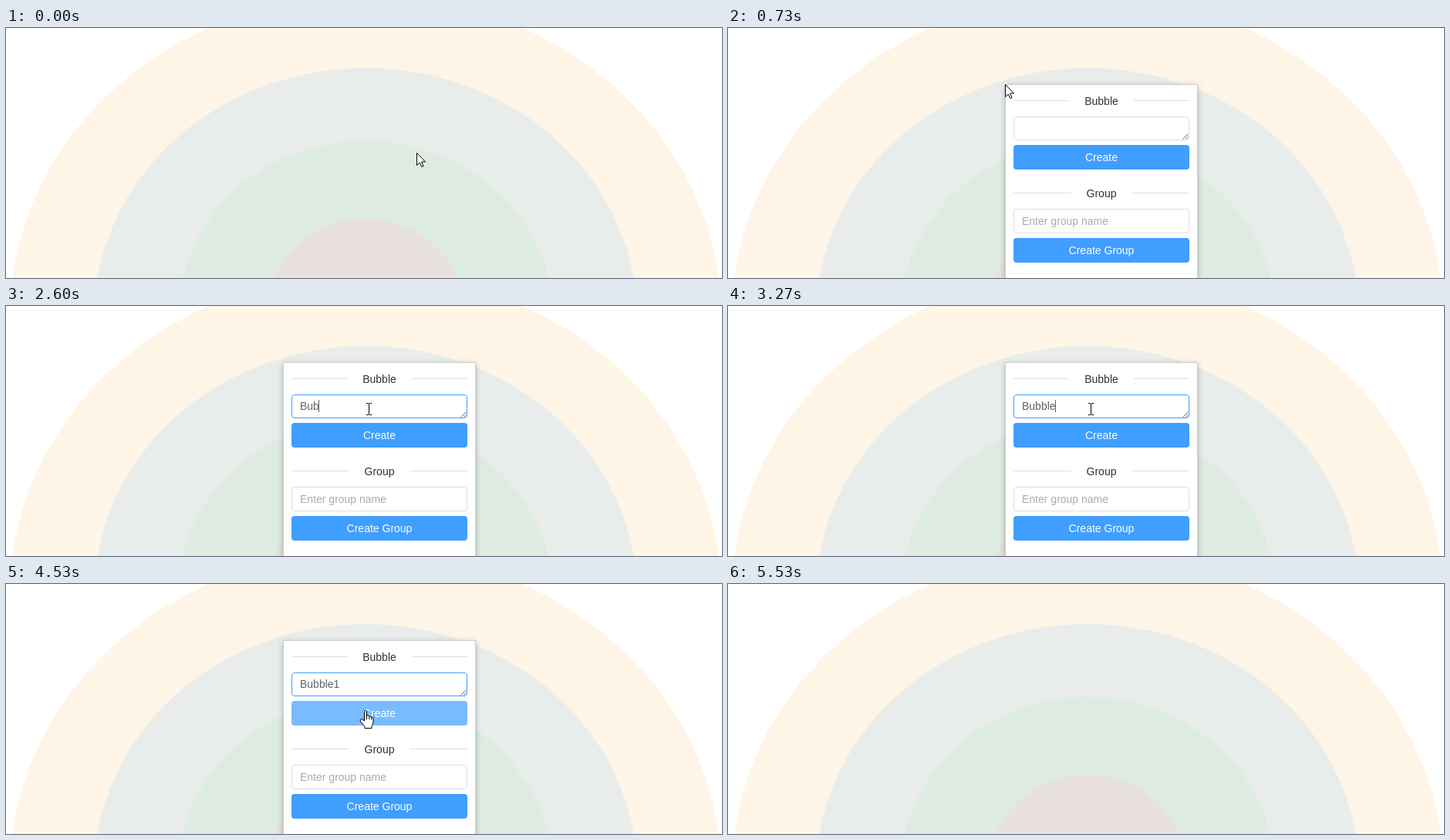
An HTML page with a canvas for the animation above (6.47 s loop, 928 by 325 pixels).

```html
<!DOCTYPE html>
<html lang="en">
<head>
<meta charset="utf-8">
<title>Create a bubble</title>
<style>
  html, body { margin: 0; width: 100%; height: 100%; overflow: hidden; background: #fff; }
  canvas { display: block; }
</style>
</head>
<body>
<canvas id="stage" width="928" height="325"></canvas>
<script>
const ctx = document.getElementById('stage').getContext('2d');
const LOOP = 6470, TICK = 1000 / 15;
const FONT = '14px "Liberation Sans", Arial, sans-serif';

// Moments of the story, in ticks
const OPEN = 11, HOVER_FIELD = 17, FOCUS = 20, HOVER_BUTTON = 65, PRESS = 76, CLOSE = 78, LEAVE = 83;
const KEYS = [32, 36, 39, 42, 45, 49, 56];
const WORD = 'Bubble1';
const BLINK = 8;

const GREY = [220, 223, 230], DARK_GREY = [192, 196, 204], BLUE = [64, 158, 255];
const LIGHT_BLUE = [121, 187, 255], DEEP_BLUE = [51, 126, 204];

// Pointer path: tick, x, y
const PATH = [
  [0, 532, 162], [1, 527, 157], [2, 505, 138], [3, 462, 108], [4, 410, 80], [5, 374, 66],
  [6, 357, 65], [7, 359, 73], [12, 359, 73], [13, 361, 74], [14, 375, 82], [15, 400, 97],
  [16, 428, 113], [17, 450, 124], [18, 463, 131], [19, 470, 134], [61, 470, 134],
  [62, 467, 134], [63, 467, 134], [64, 460, 148], [65, 463, 157], [66, 465, 162],
  [67, 466, 164], [79, 466, 164], [80, 440, 182], [81, 350, 232], [82, 175, 304]
];

const clamp = v => Math.max(0, Math.min(1, v));
const rgb = c => `rgb(${c.map(Math.round).join()})`;
const mix = (a, b, p) => a.map((v, i) => v + (b[i] - v) * p);

// Fades from one colour to the next at each [tick, colour, length]
function fade(tick, start, changes) {
  return changes.reduce((c, [at, to, len]) => mix(c, to, clamp((tick - at + 0.3) / len)), start);
}

function pointerAt(tick) {
  const i = PATH.findIndex(p => p[0] >= tick);
  if (i < 0) return PATH[PATH.length - 1].slice(1);
  if (i === 0) return PATH[0].slice(1);
  const [t0, x0, y0] = PATH[i - 1], [t1, x1, y1] = PATH[i];
  const p = (tick - t0) / (t1 - t0);
  return [Math.round(x0 + (x1 - x0) * p), Math.round(y0 + (y1 - y0) * p)];
}

function box(x, y, w, h, fill, line) {
  ctx.beginPath();
  if (line) ctx.roundRect(x + 0.5, y + 0.5, w - 1, h - 1, 3.5);
  else ctx.roundRect(x, y, w, h, 4);
  ctx.fillStyle = fill;
  ctx.fill();
  if (line) {
    ctx.strokeStyle = line;
    ctx.stroke();
  }
}

function label(text, x, y, color, align = 'center') {
  ctx.textAlign = align;
  ctx.fillStyle = color;
  ctx.fillText(text, x, y);
}

function divider(text, y, left, right) {
  ctx.fillStyle = rgb(GREY);
  ctx.fillRect(370, y, left - 370, 1);
  ctx.fillRect(right, y, 598 - right, 1);
  label(text, 484, y + 6, '#303133');
}

function button(text, y, color) {
  box(370, y, 228, 32, rgb(color));
  label(text, 484, y + 21, '#fff');
}

function rings() {
  ctx.fillStyle = '#fff';
  ctx.fillRect(0, 0, 928, 325);
  const list = [
    [461, 418, '#fff5e6'], [351.7, 323, '#e8edeb'],
    [243, 228, '#deebe1'], [129.5, 127, '#e8e0dc']
  ];
  for (const [rx, ry, color] of list) {
    ctx.beginPath();
    ctx.ellipse(466, 375, rx, ry, 0, 0, Math.PI * 2);
    ctx.fillStyle = color;
    ctx.fill();
  }
}

function field(tick) {
  const line = fade(tick, GREY, [[HOVER_FIELD, DARK_GREY, 3], [FOCUS, BLUE, 3], [PRESS, GREY, 3.4]]);
  box(370, 115, 228, 31, '#fff', rgb(line));

  ctx.strokeStyle = '#666';
  ctx.beginPath();
  ctx.moveTo(589.5, 144.5);
  ctx.lineTo(596.5, 137.5);
  ctx.moveTo(593.5, 144.5);
  ctx.lineTo(596.5, 141.5);
  ctx.stroke();

  const typed = WORD.slice(0, KEYS.filter(k => k <= tick).length);
  label(typed, 381, 135, '#606266', 'left');

  const last = [FOCUS, ...KEYS].filter(k => k <= tick).pop();
  const lit = last !== undefined && tick < PRESS && Math.floor((tick - last) / BLINK) % 2 === 0;
  if (lit) {
    ctx.fillStyle = '#606266';
    ctx.fillRect(Math.floor(381 + ctx.measureText(typed).width), typed ? 122 : 123, 1, 16);
  }
}

function panel(tick) {
  ctx.save();
  ctx.shadowColor = 'rgba(0,0,0,.25)';
  ctx.shadowBlur = 7;
  ctx.shadowOffsetY = 2;
  ctx.fillStyle = '#ccc';
  ctx.fillRect(359, 73, 250, 300);
  ctx.restore();
  ctx.fillStyle = '#fff';
  ctx.fillRect(360, 74, 248, 260);

  divider('Bubble', 94, 442, 526);
  field(tick);
  button('Create', 152, fade(tick, BLUE, [[HOVER_BUTTON, LIGHT_BLUE, 1.5], [PRESS, DEEP_BLUE, 1.4]]));
  divider('Group', 214, 445, 523);
  box(370, 235, 228, 32, '#fff', rgb(GREY));
  label('Enter group name', 381, 256, '#a8abb2', 'left');
  button('Create Group', 273, BLUE);
}

function outline(path) {
  ctx.fillStyle = '#fff';
  ctx.strokeStyle = '#000';
  ctx.lineJoin = 'round';
  ctx.fill(path);
  ctx.stroke(path);
}

const ARROW = new Path2D('M.5 .5V16.5L4.2 13L6.8 18.5L9 17.5L6.6 12H11.5Z');
const HAND = new Path2D('M-1.5 13V1.7Q-1.5 .5 0 .5T1.5 1.7V7Q4.5 5.8 4.8 8Q7.2 7 7.6 9' +
  'Q10 8.4 10 11V16Q10 18.5 8 20.5V23.5H-1V21.5L-6.5 14.5Q-7.8 12.5-6.2 11.6Q-4.5 11-1.5 14Z');
const KNUCKLES = new Path2D('M1.5 7V12M4.8 8V12M7.6 9V12.5');

function beam() {
  ctx.fillStyle = '#000';
  ctx.fillRect(0, -7, 1, 14);
  for (const y of [-8, 7]) {
    ctx.fillRect(-3, y, 3, 1);
    ctx.fillRect(1, y, 3, 1);
  }
}

function pointer(tick) {
  const [x, y] = pointerAt(tick);
  ctx.save();
  ctx.translate(x, y);
  ctx.lineWidth = 1;
  if (tick >= HOVER_FIELD && tick < 64) {
    beam();
  } else if (tick >= HOVER_BUTTON && tick < CLOSE) {
    outline(HAND);
    ctx.stroke(KNUCKLES);
  } else {
    outline(ARROW);
  }
  ctx.restore();
}

function draw(now) {
  const tick = Math.floor((now % LOOP + 5) / TICK);
  ctx.font = FONT;
  ctx.lineWidth = 1;
  rings();
  if (tick >= OPEN && tick < CLOSE) panel(tick);
  if (tick < LEAVE) pointer(tick);
}

const start = performance.now();
function frame() {
  draw(performance.now() - start);
  requestAnimationFrame(frame);
}
frame();
</script>
</body>
</html>
```
